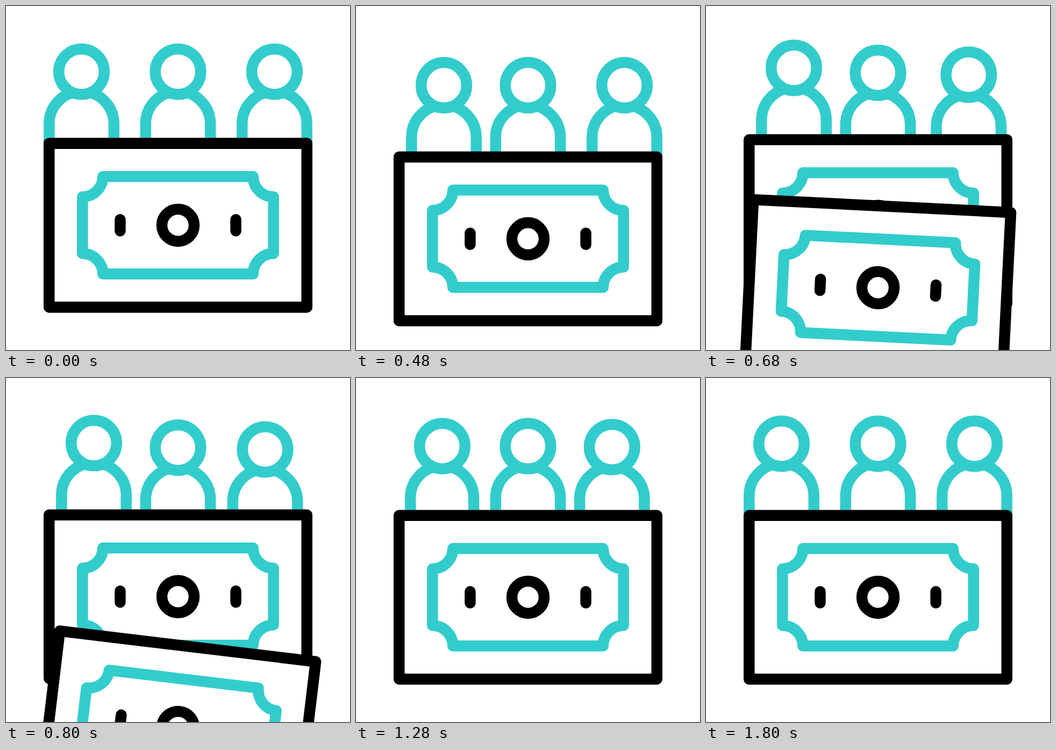
An HTML page for the animation above (2 s loop, 640x640 px).

```html
<!DOCTYPE html>
<html lang="en">
<head>
<meta charset="utf-8">
<title>Team and money</title>
<style>
  html, body { margin: 0; width: 100%; height: 100%; overflow: hidden; background: #fff; }
  svg { display: block; width: 100vw; height: 100vh; }
  .teal, .dark { fill: none; stroke: #3cc; stroke-width: 20.5; stroke-linecap: round; stroke-linejoin: round; }
  .dark { stroke: #000; }
  .solid { fill: #fff; }
</style>
</head>
<body>
<svg viewBox="0 0 640 640">
  <defs>
    <g id="board">
      <rect class="dark solid" x="80.2" y="255.8" width="479.6" height="304.4"/>
      <path class="teal" d="M180.2 317.3H459.8A37.8 37.8 0 0 0 497.7 355V460.6A37.8 37.8 0 0 0 459.8 498.4H180.2A37.8 37.8 0 0 0 142.3 460.6V355A37.8 37.8 0 0 0 180.2 317.3Z"/>
      <circle class="dark" cx="320" cy="407.9" r="30"/>
      <path class="dark" d="M212.4 397.3V418.5M427.6 397.3V418.5"/>
    </g>
  </defs>
  <g id="back">
    <g id="people"></g>
    <use href="#board"/>
  </g>
  <use id="front" href="#board"/>
</svg>
<script>
const LOOP = 2000, STEP = 40;
const NS = 'http://www.w3.org/2000/svg';
const back = document.getElementById('back');
const front = document.getElementById('front');
const people = document.getElementById('people');

const phase = (t, from, to) => Math.min(1, Math.max(0, (t - from) / (to - from)));
const easeOut = (x, p) => 1 - (1 - x) ** p;
const easeInOut = x => (1 - Math.cos(Math.PI * x)) / 2;
const hump = u => 4 * u * (1 - u);
const mix = (a, b, u) => a + (b - a) * u;

function makePerson(homeX) {
  const add = (tag, cls) => {
    const el = document.createElementNS(NS, tag);
    el.setAttribute('class', cls);
    return people.appendChild(el);
  };
  const body = add('path', 'teal');
  const head = add('circle', 'teal solid');
  head.setAttribute('r', 42.3);
  // pinchL and pinchR shift the two legs relative to the head
  return (dx, dip, pinchL = 0, pinchR = 0) => {
    const x = homeX + dx, left = x - 60.2 + pinchL, right = x + 60.2 + pinchR;
    const shoulder = 219 + dip, foot = 256 + dip;
    head.setAttribute('cx', x);
    head.setAttribute('cy', 122.2 + dip);
    body.setAttribute('d',
      `M${left} ${foot}V${shoulder}A${(right - left) / 2} 60.2 0 0 1 ${right} ${shoulder}V${foot}`);
  };
}
const [placeLeft, placeMiddle, placeRight] = [140.5, 320, 499.5].map(makePerson);

function boardOffset(t) {
  if (t <= 480) return 25.2 * easeOut(phase(t, 0, 480), 1.67);
  if (t <= 600) return mix(25.2, -9, easeOut(phase(t, 480, 600), 1.6));
  return mix(-9, 0, easeInOut(phase(t, 600, 860)));
}

function render(t) {
  const leftIn = phase(t, 0, 480);
  const rightIn = easeOut(phase(t, 520, 1080), 1.53);
  const out = phase(t, 1120, 1800) ** 1.4;
  const humpOut = hump(out);

  placeLeft(23 * (leftIn - out),
    10.7 * hump(leftIn) + 9.8 * humpOut,
    1.2 * hump(leftIn) + 2 * humpOut,
    -4.9 * hump(leftIn) - 3.4 * humpOut);
  placeMiddle(0, 9.4 * hump(rightIn) + 10 * humpOut);
  placeRight(-26.7 * (rightIn - out), 13.1 * hump(rightIn) + 13.8 * humpOut);

  back.setAttribute('transform', `translate(0 ${boardOffset(t)})`);

  // The front board breaks away, tilting as it falls
  const fall = 91 * (Math.max(0, t - 480) / 200) ** 1.85;
  const y = boardOffset(Math.min(t, 480)) + fall;
  front.setAttribute('transform', `translate(0 ${y}) rotate(${0.0315 * fall} 320 408)`);
  front.style.display = t < 920 ? '' : 'none';
}

const start = performance.now();
function tick() {
  const t = (performance.now() - start) % LOOP;
  render(Math.floor(t / STEP) * STEP);
  requestAnimationFrame(tick);
}
tick();
</script>
</body>
</html>
```
